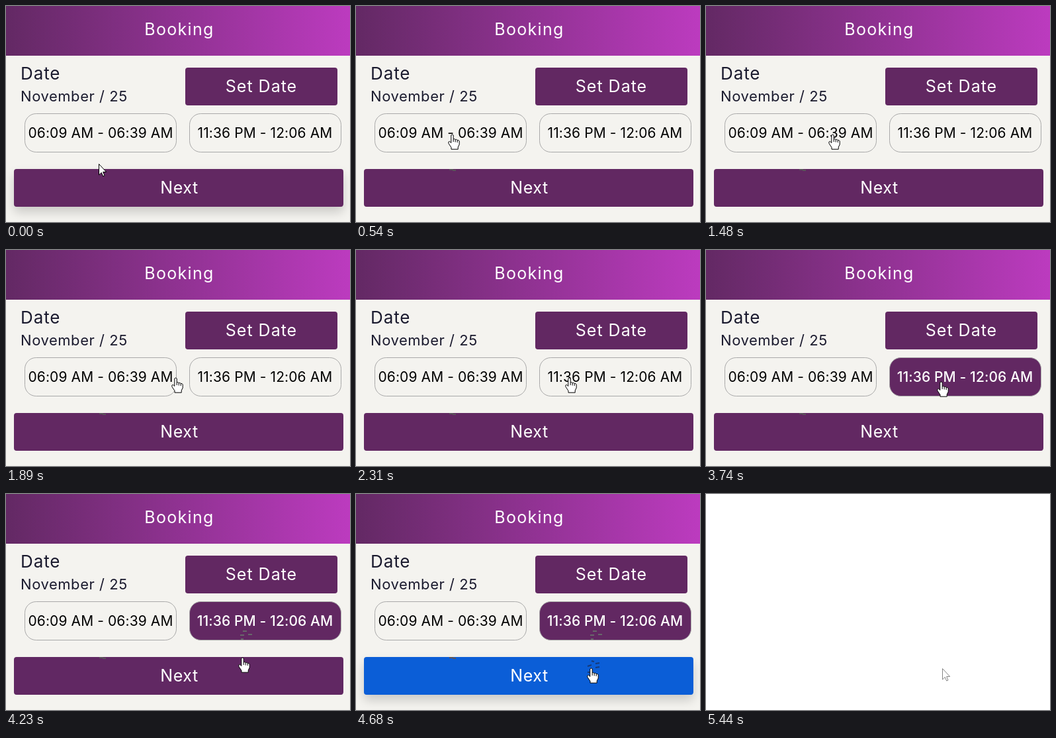
Write an HTML page that moves like this. It is 520 px wide and 326 px high and loops after 5.57 s.

```html
<!DOCTYPE html>
<html lang="en">
<head>
<meta charset="utf-8">
<title>Booking</title>
<style>
  html, body { margin: 0; width: 100%; height: 100%; overflow: hidden; background: #fff; }
  svg { display: block; width: 100%; height: 100%; }
  text { font-family: Inter, "Open Sans", sans-serif; font-size: 25px; letter-spacing: .6px; }
  .mid { text-anchor: middle; fill: #fff; }
  .ink { fill: #1a1a2e; }
  .time { font-size: 21px; letter-spacing: .1px; text-anchor: middle; }
  .slot { stroke: #a9a9a9; }
  .smudge { fill: none; stroke-width: 2; }
</style>
</head>
<body>
<svg viewBox="0 0 520 326">
  <defs>
    <linearGradient id="bar">
      <stop offset="0" stop-color="#632964"/>
      <stop offset="1" stop-color="#bc3bbf"/>
    </linearGradient>
    <filter id="soft" x="-20%" y="-80%" width="140%" height="260%">
      <feGaussianBlur stdDeviation="8"/>
    </filter>
  </defs>

  <g id="page">
    <rect width="520" height="326" fill="#f4f3ef"/>
    <rect width="520" height="75" fill="url(#bar)"/>
    <text class="mid" x="262" y="44" style="letter-spacing:1.3px">Booking</text>

    <text class="ink" x="22" y="111" style="font-size:26px;letter-spacing:.9px">Date</text>
    <text class="ink" x="22" y="144" style="font-size:22px;letter-spacing:.55px">November / 25</text>
    <rect x="271" y="93" width="230" height="57" rx="4" fill="#622862"/>
    <text class="mid" x="386" y="130" style="letter-spacing:1px">Set Date</text>

    <rect class="slot" x="28.5" y="162.5" width="229" height="58" rx="17"/>
    <text class="time" x="143" y="199">06:09 AM - 06:39 AM</text>
    <rect class="slot" id="slot" x="277.5" y="162.5" width="229" height="58" rx="17"/>
    <text class="time" id="slotText" x="391.5" y="199">11:36 PM - 12:06 AM</text>

    <rect id="shadow" x="12" y="254" width="498" height="57" rx="4" filter="url(#soft)"/>
    <rect id="next" x="12" y="246" width="498" height="57" rx="4"/>
    <text class="mid" x="262" y="283">Next</text>

    <path class="smudge" id="trailA" d="M141 247h6M146 248h5" stroke="#5a545a"/>
    <path class="smudge" id="trailB" d="M358 207h6M354 213h6M366 212h6M355 219h4" stroke="#67676a"/>
    <path class="smudge" id="trailC" d="M356 252l4 1M362 256l6-1M350 260l6-2M362 262l6-1M350 269h5" stroke="#173a78"/>
  </g>

  <circle id="click" r="15" fill="#fbf000" opacity=".65"/>
  <g id="cursor" fill="#fff" stroke="#000" stroke-linejoin="round">
    <path id="arrow" d="M.5 .5V17L4.300 13.400 6.700 19 9 18 6.700 12.500H11.700Z"/>
    <g id="hand" transform="translate(-1.500 -.5)">
      <path d="M-1.700 1.500Q0-.7 1.700 1.500V7.500Q3.400 6.400 4.700 8.100Q6.400 7.200 7.700 9Q9.800 8.300 10.700 10.500V15.500L8.700 19.500V22.700H-1.500V20L-5.500 14Q-6.500 10.900-4 10.800L-1.700 13Z"/>
      <path d="M1.700 7.500V11.500M4.700 8.500V12M7.700 9.500V12.500" fill="none"/>
    </g>
  </g>
</svg>
<script>
const LOOP = 5570;
const PAPER = '#f4f3ef';
const PURPLE = [98, 40, 98], BLUE = [11, 94, 215], PRESSED = '#0a58ca';

const el = id => document.getElementById(id);
const set = (id, name, value) => el(id).setAttribute(name, value);
const show = (id, on) => set(id, 'visibility', on ? 'inherit' : 'hidden');
const span = (t, a, b) => Math.min(1, Math.max(0, (t - a) / (b - a)));
const mix = (a, b, u) => a + (b - a) * u;

// Constant speed with a soft start and stop of length r.
const glide = r => u => {
  const k = 2 * r * (1 - r);
  if (u < r) return u * u / k;
  if (u > 1 - r) return 1 - (1 - u) ** 2 / k;
  return (u - r / 2) / (1 - r);
};
const easeOut = u => 1 - (1 - u) ** 3;

const START = [140, 238];
const MOVES = [
  { from: 20, to: 540, at: [147, 194], ease: glide(.3) },
  { from: 1120, to: 2590, at: [357, 193], ease: glide(.1) },
  { from: 3630, to: 4110, at: [359, 244], ease: glide(.3) },
  { from: 4200, to: 4680, at: [357, 263], ease: easeOut }
];

function pointer(t) {
  let [x, y] = START;
  for (const m of MOVES) {
    const u = m.ease(span(t, m.from, m.to));
    x = mix(x, m.at[0], u);
    y = mix(y, m.at[1], u);
  }
  return [Math.round(x), Math.round(y)];
}

function draw(t) {
  const [x, y] = pointer(t);
  const blank = t >= 5440;
  const pressed = t >= 5290;
  const chosen = t >= 3310;
  const hover = span(t, 4230, 4380);
  const place = `translate(${x} ${y})`;

  show('page', !blank);
  set('slot', 'fill', chosen ? '#622862' : PAPER);
  set('slotText', 'fill', chosen ? '#fff' : '#000');
  set('slotText', 'font-weight', chosen ? 500 : 400);

  const tint = PURPLE.map((c, i) => Math.round(mix(c, BLUE[i], hover)));
  set('next', 'fill', pressed ? PRESSED : `rgb(${tint})`);
  set('shadow', 'opacity', .17 * Math.max(1 - span(t, 20, 170), hover));

  show('trailA', t > 200);
  show('trailB', t > 3900);
  show('trailC', t > 4400);

  const overLink = !blank && (y < 221 || y >= 246);
  show('hand', overLink);
  show('arrow', !overLink);
  set('cursor', 'transform', place);
  set('cursor', 'stroke', blank ? '#858585' : '#000');
  set('click', 'transform', place);
  show('click', !blank && (pressed || (t >= 3190 && t < 3310)));
}

document.querySelector('.slot').setAttribute('fill', PAPER);
const begin = performance.now();
function tick() {
  draw((performance.now() - begin) % LOOP);
  requestAnimationFrame(tick);
}
draw(0);
requestAnimationFrame(tick);
</script>
</body>
</html>
```
